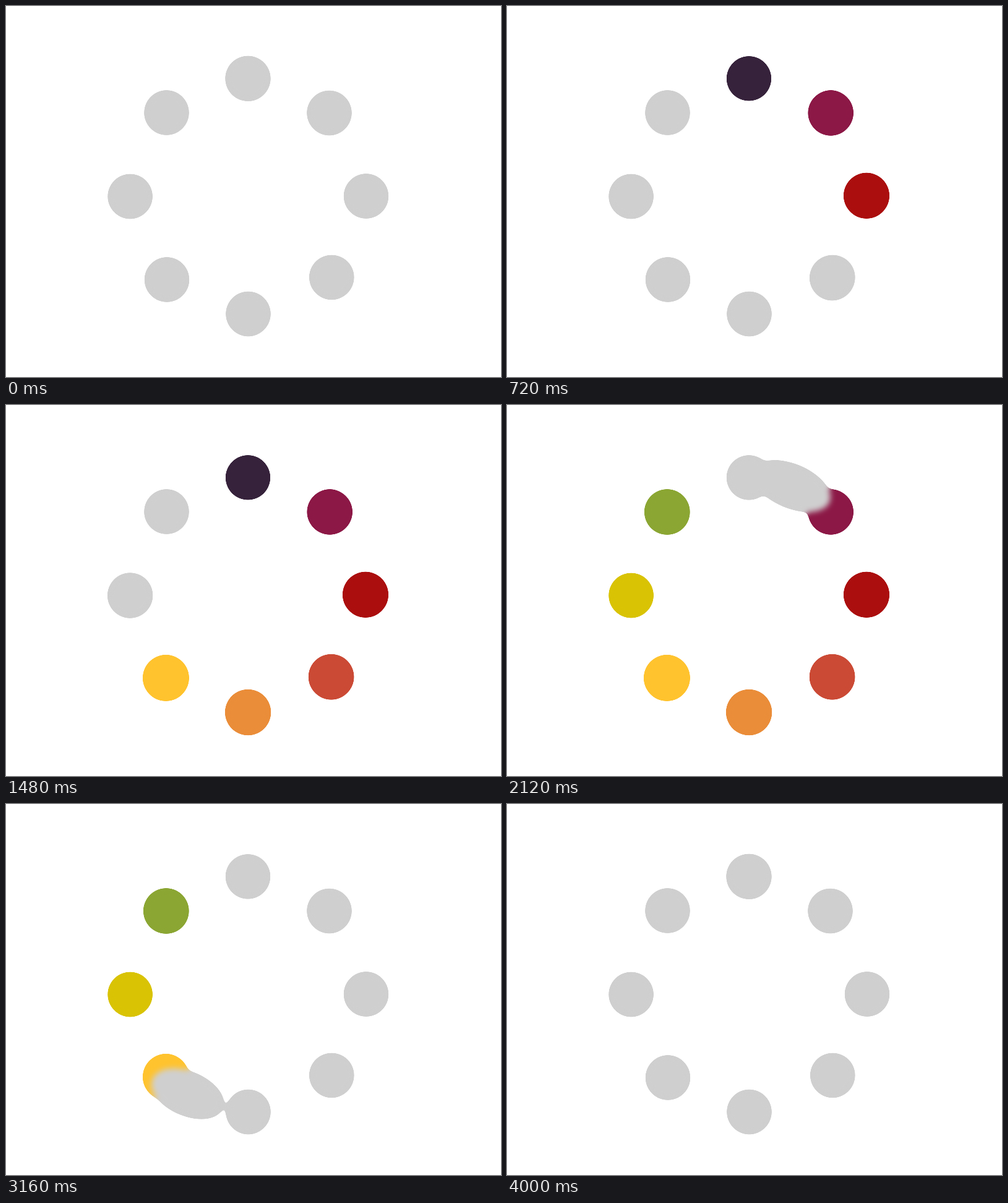
Recreate the animation shown at these times as an HTML page. Size 800x600 px, loop 4.04 s.

```html
<!DOCTYPE html>
<html lang="en">
<head>
<meta charset="utf-8">
<title>Gooey ring loader</title>
<style>
  html, body { margin: 0; width: 100%; height: 100%; overflow: hidden; background: #fff; }
  svg { display: block; width: 100%; height: 100%; }
</style>
</head>
<body>
<svg viewBox="0 0 800 600">
  <filter id="goo" filterUnits="userSpaceOnUse" x="0" y="0" width="800" height="600" color-interpolation-filters="sRGB">
    <feGaussianBlur stdDeviation="5"/>
    <feColorMatrix values="1 0 0 0 0  0 1 0 0 0  0 0 1 0 0  0 0 0 20 -9.1"/>
  </filter>
  <g id="ring" filter="url(#goo)"></g>
</svg>
<script>
const LOOP = 4040, STEP = 40, HOP = 250, LAP = 8 * HOP;
const REST_END = 0.11, MOVE_END = 0.88;   // moving part of each hop
const CENTER = { x: 391, y: 307.5 };
const GREY = '#cfcfcf';

// Resting grey dot (x, y), then the coloured dot (x, y, r) that replaces it.
const dots = [
  [391, 117.3, 391, 117.3, 36.3, '#36223b'],
  [522.5, 173, 523.2, 173, 36.9, '#8c1846'],
  [582, 307.5, 581, 306.8, 37.2, '#ab0e0e'],
  [526.3, 438.8, 525.6, 439.7, 37, '#cb4a35'],
  [391.5, 498, 391.1, 497, 37.3, '#ea8d39'],
  [260, 442.5, 258.4, 441.4, 37.6, '#ffc32e'],
  [200.6, 308, 200.6, 308, 36.4, '#d9c304'],
  [259.5, 172.5, 258.8, 173, 37, '#8ba633']
].map(([x, y, cx, cy, r, color]) => ({ x, y, cx, cy, r, color, node: add('circle') }));
const blob = add('ellipse');
blob.setAttribute('fill', GREY);

function add(tag) {
  return document.getElementById('ring')
    .appendChild(document.createElementNS('http://www.w3.org/2000/svg', tag));
}

function set(node, attributes) {
  for (const name in attributes) node.setAttribute(name, attributes[name]);
}

function drawDots(t) {
  dots.forEach((d, i) => {
    const on = (i + REST_END) * HOP;
    const off = LAP + (i - 1 + MOVE_END) * HOP;
    const lit = t > on && t < off;
    set(d.node, lit
      ? { cx: d.cx, cy: d.cy, r: d.r, fill: d.color }
      : { cx: d.x, cy: d.y, r: 36.4, fill: GREY });
  });
}

function drawBlob(t) {
  const hop = Math.floor(t / HOP), u = t / HOP - hop;
  const p = Math.min(1, Math.max(0, (u - REST_END) / (MOVE_END - REST_END)));
  const from = dots[hop % 8], to = dots[(hop + 1) % 8];
  const dx = to.cx - from.cx, dy = to.cy - from.cy;
  const arch = Math.sin(Math.PI * p);
  let x = from.cx + dx * p, y = from.cy + dy * p;
  const dist = Math.hypot(x - CENTER.x, y - CENTER.y);
  const bulge = 1 + 14 * arch / dist;
  x = CENTER.x + (x - CENTER.x) * bulge;
  y = CENTER.y + (y - CENTER.y) * bulge;
  const angle = Math.atan2(dy, dx) * 180 / Math.PI;
  set(blob, {
    rx: 36.8 + 30 * arch,
    ry: 36.8 - arch,
    transform: `translate(${x} ${y}) rotate(${angle})`
  });
}

function frame(now) {
  const t = Math.floor((now % LOOP) / STEP) * STEP;
  drawDots(t);
  drawBlob(t);
  requestAnimationFrame(frame);
}
frame(0);
</script>
</body>
</html>
```
